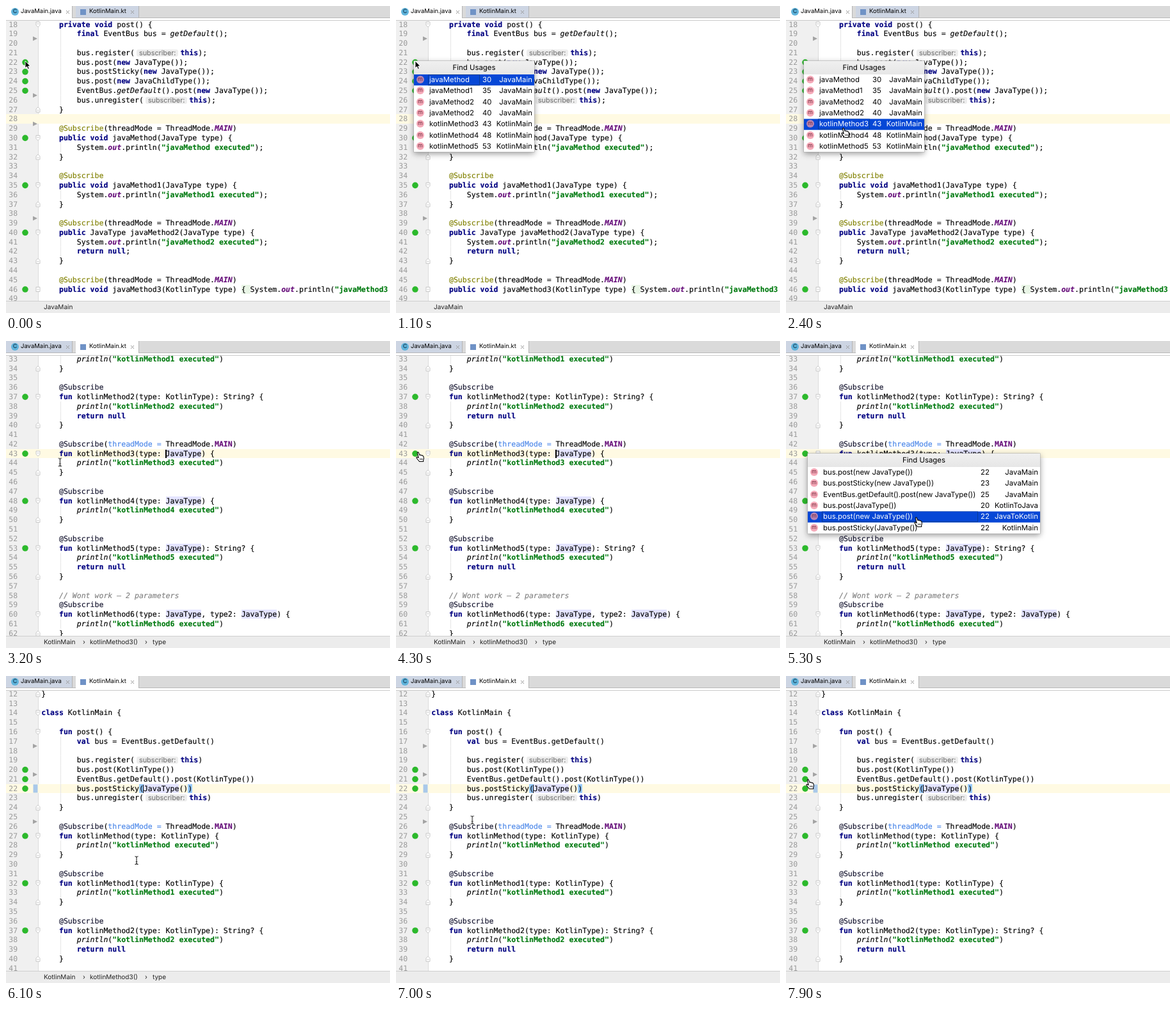
Animation, 600 px wide and 480 px high, one loop 8 s. Source, as an HTML page:

```html
<!DOCTYPE html>
<html lang="en">
<head>
<meta charset="utf-8">
<title>Editor: find usages</title>
<style>
  html, body { margin: 0; width: 100%; height: 100%; overflow: hidden; background: #fff; }
  body { position: relative; font-family: Inter, Roboto, sans-serif; color: #000;
         text-rendering: geometricPrecision; cursor: default; }
  #stage { position: absolute; left: 0; top: 0; width: 600px; height: 480px; overflow: hidden; }
  #stage * { box-sizing: border-box; }
  .view, .view svg, .row, .popup, .popup span, .bar, .tab, .tab *, .crumbs, .crumbs span, #cursor, #cursor svg { position: absolute; }
  .view, .view > svg { left: 0; top: 0; width: 600px; height: 480px; }
  .view { background: linear-gradient(90deg, #f0f0f0 50px, #dcdcdc 50px 51px, #fff 51px); }

  /* code */
  .row { left: 0; width: 600px; height: 14.79px; line-height: 14.79px; white-space: pre;
         font-family: "DejaVu Sans Mono", "Liberation Mono", monospace; font-size: 11.54px; }
  .row > b { position: absolute; left: 4.2px; font-weight: 400; color: #999; }
  .row > code { position: absolute; left: 55.2px; font: inherit; -webkit-text-stroke: .15px; }
  .row.now { background: #fffae3; }
  .kw { color: #000080; font-weight: 700; }
  .str { color: #007a10; font-weight: 700; }
  .ann { color: #808000; }
  .kotlin .ann { color: #14142e; }
  .const { color: #660e7a; font-weight: 700; }
  .java .const, .call, .note { font-style: italic; }
  .note { color: #808080; }
  .arg { color: #4a86e8; }
  .use { background: #e4e4ff; }
  .pair { background: #99ccff; }
  .fold { background: #e9f5e6; }
  .hint { display: inline-block; height: 11px; line-height: 11px; margin: 0 3.5px; padding: 0 3.5px;
          border-radius: 3px; background: #ededed; color: #7a7a7a;
          font-family: Inter, Roboto, sans-serif; font-size: 10.8px; }
  .caret { display: inline-block; width: 2px; height: 13px; margin: 0 -1px; background: #000; vertical-align: -3px; }

  /* tabs and breadcrumbs */
  .bar { left: 0; top: 0; width: 600px; height: 23px; border-bottom: 1px solid #c9c9c9;
         background: linear-gradient(#dadada 18px, #b8b8b8 18px 19px, #fff 19px); }
  .tab { top: 0; height: 18px; background: #cdd5e3; border-right: 1px solid #b4b4b4; font-size: 9.5px; line-height: 18px; white-space: pre; }
  .tab.open { height: 19px; background: #fff; }
  .tab i { left: 8px; top: 3px; width: 12px; height: 12px; border-radius: 50%; background: #5fb4dc;
           color: #1d4660; font: 600 9px/12px Inter, sans-serif; text-align: center; }
  .tab i.file { top: 5px; left: 7px; width: 9px; height: 9px; border-radius: 0; background: #6f92c6; }
  .tab svg { top: 6px; width: 7px; height: 7px; }
  .crumbs { left: 0; top: 461px; width: 600px; height: 19px; background: #ececec; border-top: 1px solid #cfcfcf;
            font-size: 10px; line-height: 18px; white-space: pre; color: #222; }

  /* popups */
  .popup { background: #fff; box-shadow: 0 0 0 .5px #aaa, 0 3px 9px rgba(0,0,0,.4); font-size: 11.4px; white-space: nowrap; }
  .popup h4 { margin: 0; height: 21px; font: inherit; line-height: 21px; text-align: center; background: linear-gradient(#f0f0f0, #e6e6e6); }
  .list { position: absolute; left: 0; top: 21px; width: 100%; }
  .list div { position: relative; height: 17.35px; line-height: 17.35px; }
  .list .m { left: 4px; top: 2px; width: 12px; height: 12px; border-radius: 50%; background: #f5a9b8;
             font-size: 9px; line-height: 11px; text-align: center; color: #6b2536; }
  .list .name { left: 24px; }
  .list .type { right: 3px; }
  .list.on { --k: 0; background: #0647d6; color: #fff;
             clip-path: inset(calc(var(--k) * 17.35px) 0 calc((var(--n) - 1 - var(--k)) * 17.35px) 0); }
  .list.on .cell { left: 22px; top: 0; height: 17px; border: 1px solid #083c95; }
  .list.on .m { background: #b583b4; }

  /* timeline: 1% = 80 ms */
  .step { animation: 8s step-end infinite; }
  #viewA { animation-name: viewA; }
  #viewB { animation-name: viewB; }
  #viewC { animation-name: viewC; }
  #popA { animation-name: popA; }
  #popB { animation-name: popB; }
  #viewB .caret { animation: caretB 8s step-end infinite; }
  #popA .on { animation: pickA 8s step-end infinite; }
  #popB .on { animation: pickB 8s step-end infinite; }
  #crumbOld { animation-name: crumbOld; }
  #crumbNew { animation-name: crumbNew; }
  @keyframes viewA { 0% { visibility: visible } 35%, 100% { visibility: hidden } }
  @keyframes viewB { 0% { visibility: hidden } 35% { visibility: visible } 75%, 100% { visibility: hidden } }
  @keyframes viewC { 0% { visibility: hidden } 75%, 100% { visibility: visible } }
  @keyframes popA { 0% { visibility: hidden } 12.5% { visibility: visible } 35%, 100% { visibility: hidden } }
  @keyframes popB { 0% { visibility: hidden } 58.75% { visibility: visible } 75%, 100% { visibility: hidden } }
  @keyframes caretB { 0% { opacity: 1 } 58.75%, 100% { opacity: 0 } }
  @keyframes crumbOld { 0% { opacity: 1 } 81.25%, 100% { opacity: 0 } }
  @keyframes crumbNew { 0% { opacity: 0 } 81.25%, 100% { opacity: 1 } }
  @keyframes pickA { 0% { --k: 0 } 22.3% { --k: 1 } 23.5% { --k: 2 } 24.6% { --k: 3 } 26%, 100% { --k: 4 } }
  @keyframes pickB { 0% { --k: 0 } 62.4% { --k: 1 } 63% { --k: 2 } 63.6% { --k: 3 } 64.3% { --k: 4 } 70.9%, 100% { --k: 5 } }

  #cursor { left: 0; top: 0; width: 0; height: 0; animation: move 8s ease-in-out infinite; }
  #cursor svg { left: -10px; top: -10px; width: 32px; height: 32px; }
  #arrow { animation-name: arrow; }
  #hand { animation-name: hand; }
  #beam { animation-name: beam; }
  @keyframes move {
    0%, 17.5% { transform: translate(30px, 86px) }
    29%, 37.5% { transform: translate(90px, 191px) }
    48.75%, 60% { transform: translate(35px, 174px) }
    65.6%, 68.75% { transform: translate(204px, 276px) }
    72.5%, 81.25% { transform: translate(204px, 288px) }
    93.75%, 100% { transform: translate(35px, 162px) }
  }
  @keyframes arrow { 0% { opacity: 1 } 20%, 100% { opacity: 0 } }
  @keyframes hand { 0% { opacity: 0 } 20% { opacity: 1 } 35% { opacity: 0 } 46% { opacity: 1 } 75% { opacity: 0 } 91.5%, 100% { opacity: 1 } }
  @keyframes beam { 0% { opacity: 0 } 35% { opacity: 1 } 46% { opacity: 0 } 75% { opacity: 1 } 91.5%, 100% { opacity: 0 } }
</style>
</head>
<body>
<div id="stage">
  <div id="views"></div>
  <div id="popups"></div>
  <div id="cursor">
    <svg id="arrow" class="step" viewBox="-10 -10 32 32"><path d="M0 0V11L2.6 8.7 4.4 12.8 6.3 12 4.6 8H8Z" stroke="#fff" stroke-width=".9"/></svg>
    <svg id="hand" class="step" viewBox="-10 -10 32 32"><path d="M-1.6 1.2Q-1.4-.6 .1 0L2 4.6 3.3 4 5 5 6.4 4.8 8 6.6Q9 10 7.7 12V14.5H1.6L-2.9 9Q-3.6 7.4-2 7.4L.2 8.6Z" fill="#fff" stroke="#000" stroke-width="1.1" stroke-linejoin="round"/><path d="M2.6 9.4V12M4.4 9.4V12M6.1 9.4V12" stroke="#000" stroke-width=".7"/></svg>
    <svg id="beam" class="step" viewBox="-10 -10 32 32"><path d="M-2.6-6Q0-6 0-4Q0-6 2.6-6M0-4V5M-2.6 6.5Q0 6.5 0 4.5Q0 6.5 2.6 6.5M-1.3 2.5H1.3" fill="none" stroke="#222" stroke-width="1.1"/></svg>
  </div>
</div>
<script>
const PITCH = 14.79;

const views = [
  { id: 'viewA', lang: 'java', first: 18, last: 49, now: 10, top: 28.9, arrows: [1.5, 7.5, 10.5, 20.5], code: `
    private void post() {
        final EventBus bus = getDefault();

        bus.register(~this);
        bus.post(new JavaType());
        bus.postSticky(new JavaType());
        bus.post(new JavaChildType());
        EventBus.getDefault().post(new JavaType());
        bus.unregister(~this);
    }

    @Subscribe(threadMode = ThreadMode.MAIN)
    public void javaMethod(JavaType type) {
        System.out.println("javaMethod executed");
    }

    @Subscribe
    public void javaMethod1(JavaType type) {
        System.out.println("javaMethod1 executed");
    }

    @Subscribe(threadMode = ThreadMode.MAIN)
    public JavaType javaMethod2(JavaType type) {
        System.out.println("javaMethod2 executed");
        return null;
    }

    @Subscribe(threadMode = ThreadMode.MAIN)
    public void javaMethod3(KotlinType type) { System.out.println("javaMethod3 executed"); }
` },
  { id: 'viewB', lang: 'kotlin', first: 33, now: 10, top: 28.2, arrows: [], code: `
        println("kotlinMethod1 executed")
    }

    @Subscribe
    fun kotlinMethod2(type: KotlinType): String? {
        println("kotlinMethod2 executed")
        return null
    }

    @Subscribe(threadMode = ThreadMode.MAIN)
    fun kotlinMethod3(type: |JavaType) {
        println("kotlinMethod3 executed")
    }

    @Subscribe
    fun kotlinMethod4(type: JavaType) {
        println("kotlinMethod4 executed")
    }

    @Subscribe
    fun kotlinMethod5(type: JavaType): String? {
        println("kotlinMethod5 executed")
        return null
    }

    // Wont work – 2 parameters
    @Subscribe
    fun kotlinMethod6(type: JavaType, type2: JavaType) {
        println("kotlinMethod6 executed")
    }` },
  { id: 'viewC', lang: 'kotlin', first: 12, now: 10, top: 28.2, arrows: [5.5, 8.5, 13.5], code: `
}

class KotlinMain {

    fun post() {
        val bus = EventBus.getDefault()

        bus.register(~this)
        bus.post(KotlinType())
        EventBus.getDefault().post(KotlinType())
        bus.postSticky[(]|JavaType()[)]
        bus.unregister(~this)
    }

    @Subscribe(threadMode = ThreadMode.MAIN)
    fun kotlinMethod(type: KotlinType) {
        println("kotlinMethod executed")
    }

    @Subscribe
    fun kotlinMethod1(type: KotlinType) {
        println("kotlinMethod1 executed")
    }

    @Subscribe
    fun kotlinMethod2(type: KotlinType): String? {
        println("kotlinMethod2 executed")
        return null
    }
` }
];

// Token classes per language; ~ is a parameter hint, | the caret, [x] a matched bracket.
const common = { str: '"[^"]*"', ann: '@Subscribe', hint: '~' };
const syntax = {
  java: { ...common, kw: '\\b(?:private|public|void|final|new|this|return|null)\\b',
          const: '\\b(?:MAIN|out)\\b', call: '\\bgetDefault\\b', fold: '\\{ (?=System)' },
  kotlin: { ...common, note: '//.*', kw: '\\b(?:class|fun|val|this|return|null)\\b', const: '\\bMAIN\\b',
            call: '\\bprintln\\b', arg: 'threadMode =', use: '\\bJavaType\\b', caret: '\\|', pair: '\\[.\\]' }
};

function paint(text, lang) {
  const rule = Object.entries(syntax[lang]).map(([k, v]) => `(?<${k}>${v})`).join('|');
  return text.replace(new RegExp(rule, 'g'), (...m) => {
    const groups = m[m.length - 1];
    const kind = Object.keys(groups).find(k => groups[k] !== undefined);
    const body = { hint: 'subscriber:', caret: '', pair: m[0][1] }[kind] ?? m[0];
    return `<span class="${kind}">${body}</span>`;
  });
}

// Posts and one-parameter subscribers get an icon.
function gutter(text, next, y) {
  const icon = /\.post|\b(java|kotlin)Method\d?\([^,]*$/.test(text) ? `<circle cx="30" cy="${y}" r="4.8" fill="#2cb92c"/>` : '';
  const shape = /\{ S/.test(text) ? 'M47-3.5h6v7h-6ZM48.5 0h3' :
    /\{$/.test(text) ? 'M47-4h6v5l-3 3-3-3ZM48.5-1h3' :
    /^ *\}$/.test(text) ? 'M47 4h6v-5l-3-3-3 3ZM48.5 1h3' : '';
  const fold = shape && `<path transform="translate(0 ${y})" d="${shape}" fill="#fff" stroke="#c2c2c2" stroke-width=".9"/>`;
  const inner = /^ {8}/.test(text) || (!text && /^ {8}/.test(next));
  const guide = inner ? `<path d="M85.5 ${y - 7.4}v${PITCH}" stroke="#e6e6e6"/>` : '';
  return guide + icon + fold;
}

const cross = x => `<svg style="left:${x}px" viewBox="0 0 7 7"><path d="M1 1 6 6M6 1 1 6" stroke="#999"/></svg>`;
const crumb = list => list.map(([x, t]) => `<span style="left:${x}px">${t}</span>`).join('');

function frame(v) {
  const java = v.lang === 'java';
  const main = [[59, 'KotlinMain'], [120, '›']];
  const old = crumb([...main, [131, 'kotlinMethod3()'], [217, '›'], [229, 'type']]);
  const path = java ? crumb([[59, 'JavaMain']]) : v.id === 'viewB' ? old :
    `<span class="step" id="crumbOld" style="left:0">${old}</span>
     <span class="step" id="crumbNew" style="left:0">${crumb([...main, [131, 'post()']])}</span>`;
  return `<div class="bar">
      <div class="tab ${java ? 'open' : ''}" style="left:0;width:104px"><i>C</i><span style="left:23px">JavaMain.java</span>${cross(93)}</div>
      <div class="tab ${java ? '' : 'open'}" style="left:109px;width:99px"><i class="file"></i><span style="left:21px">KotlinMain.kt</span>${cross(85)}</div>
    </div><div class="crumbs">${path}</div>`;
}

document.getElementById('views').innerHTML = views.map(v => {
  const lines = v.code.slice(1).split('\n');
  let rows = '', marks = '';
  lines.forEach((text, i) => {
    const y = v.top + i * PITCH;
    const num = v.last && i === lines.length - 1 ? v.last : v.first + i;
    rows += `<div class="row ${i === v.now ? 'now' : ''}" style="top:${y - PITCH / 2}px"><b>${num}</b><code>${paint(text, v.lang)}</code></div>`;
    marks += gutter(text, lines[i + 1] || '', y);
  });
  for (const r of v.arrows) marks += `<path transform="translate(42 ${v.top + r * PITCH})" d="M0-3.5 7 0 0 3.5Z" fill="#a3a3a3"/>`;
  if (v.id === 'viewC') marks += '<path d="M42.5 169.5h7v13h-7Z" fill="#a9c8ea"/>';
  return `<div class="view step ${v.lang}" id="${v.id}">${rows}<svg viewBox="0 0 600 480">${marks}</svg>${frame(v)}</div>`;
}).join('');

function popup(id, x, y, w, numX, items) {
  const list = items.map(([name, num, type]) => `<div><span class="cell" style="width:${numX - 26}px"></span>
    <span class="m">m</span><span class="name">${name}</span><span style="left:${numX}px">${num}</span><span class="type">${type}</span></div>`).join('');
  const h = 21 + items.length * 17.35;
  return `<div class="popup step" id="${id}" style="left:${x}px;top:${y}px;width:${w}px;height:${h}px;--n:${items.length}">
    <h4>Find Usages</h4><div class="list">${list}</div><div class="list on">${list}</div></div>`;
}

document.getElementById('popups').innerHTML =
  popup('popA', 28, 86, 188, 107, [
    ['javaMethod', 30, 'JavaMain'], ['javaMethod1', 35, 'JavaMain'],
    ['javaMethod2', 40, 'JavaMain'], ['javaMethod2', 40, 'JavaMain'],
    ['kotlinMethod3', 43, 'KotlinMain'], ['kotlinMethod4', 48, 'KotlinMain'], ['kotlinMethod5', 53, 'KotlinMain']
  ]) +
  popup('popB', 34, 176, 363, 270, [
    ['bus.post(new JavaType())', 22, 'JavaMain'], ['bus.postSticky(new JavaType())', 23, 'JavaMain'],
    ['EventBus.getDefault().post(new JavaType())', 25, 'JavaMain'], ['bus.post(JavaType())', 20, 'KotlinToJava'],
    ['bus.post(new JavaType())', 22, 'JavaToKotlin'], ['bus.postSticky(JavaType())', 22, 'KotlinMain']
  ]);
</script>
</body>
</html>
```
